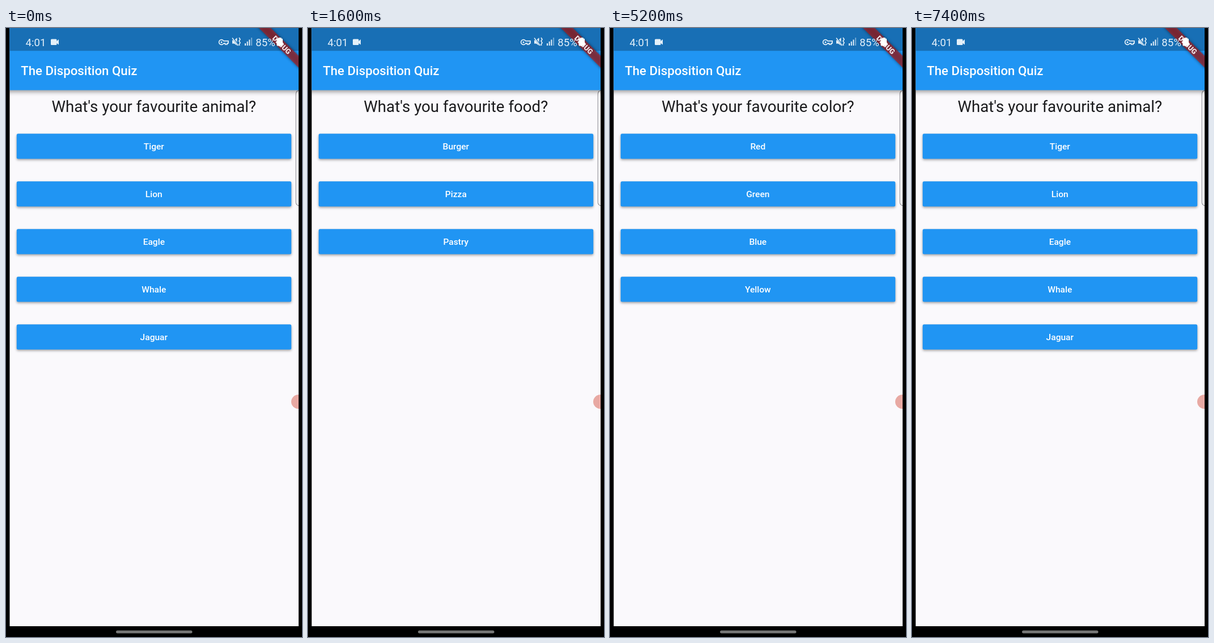
Write an HTML page with a canvas that moves like this. It is 522x1073 px and loops after 8000 ms.

```html
<!DOCTYPE html>
<html lang="en">
<head>
<meta charset="utf-8">
<title>Quiz app</title>
<style>
  html, body { margin: 0; width: 522px; height: 1073px; overflow: hidden; background: #000; }
  canvas { display: block; }
</style>
</head>
<body>
<canvas id="stage" width="522" height="1073"></canvas>
<script>
const ctx = document.getElementById('stage').getContext('2d');
const LOOP = 8000, STEP = 100;
const LEFT = 6.5, RIGHT = 516, BOTTOM = 1054, MID = 260.8;
const BLUE = '#2095f3', PAPER = '#faf9fc';

const color = { title: "What's your favourite color?", answers: ['Red', 'Green', 'Blue', 'Yellow'] };
const animal = { title: "What's your favourite animal?", answers: ['Tiger', 'Lion', 'Eagle', 'Whale', 'Jaguar'] };
const food = { title: "What's you favourite food?", answers: ['Burger', 'Pizza', 'Pastry'] };
const result = null;

const scenes = [[0, animal], [1300, food], [2200, result], [5200, color], [6800, animal]];
const taps = [
  { start: 1195, row: 2, x: 372, y: 384 },
  { start: 6750, row: 0, x: 414.5, y: 213 }
];

function text(str, x, y, size, weight = 400, fill = '#fff', align = 'center') {
  ctx.font = `${weight} ${size}px Roboto, sans-serif`;
  ctx.textAlign = align;
  ctx.fillStyle = fill;
  ctx.fillText(str, x, y);
}

function box(x, y, w, h, fill, radius = 0) {
  ctx.fillStyle = fill;
  ctx.beginPath();
  ctx.roundRect(x, y, w, h, radius);
  ctx.fill();
}

function shape(points, fill) {
  ctx.fillStyle = fill;
  ctx.beginPath();
  points.forEach(([x, y]) => ctx.lineTo(x, y));
  ctx.fill();
}

function line(points, stroke, width) {
  ctx.strokeStyle = stroke;
  ctx.lineWidth = width;
  ctx.beginPath();
  points.forEach(([x, y]) => ctx.lineTo(x, y));
  ctx.stroke();
}

function disc(x, y, r, fill) {
  ctx.fillStyle = fill;
  ctx.beginPath();
  ctx.arc(x, y, r, 0, Math.PI * 2);
  ctx.fill();
}

function raised(x, y, w, h, fill, radius, blur, drop) {
  ctx.save();
  ctx.shadowColor = 'rgba(0,0,0,.36)';
  ctx.shadowBlur = blur;
  ctx.shadowOffsetY = drop;
  box(x, y, w, h, fill, radius);
  ctx.restore();
}

const rowTop = row => 186.2 + row * 84;

function drawQuestion({ title, answers }) {
  text(title, MID, 148, 27.7, 400, '#1b1b1d');
  answers.forEach((label, row) => {
    raised(18.8, rowTop(row), 484.4, 44.4, BLUE, 2.5, 4, 2);
    text(label, MID, rowTop(row) + 28, 15.55, 500);
  });
}

function drawResult() {
  text('You should aspire to be a better human being', MID, 130.5, 22.2, 700, '#f84f51');
  raised(43.4, 172.5, 435.2, 123.2, '#448aff', 2.5, 4, 2);
  text('Restart The App', MID, 244, 27.7, 500);
}

// A touch ripple spreads from the finger and fades inside its button.
function drawRipple({ start, row, x, y }, time) {
  const age = time - start;
  const fade = Math.min(1, 2 - age / 100);
  if (age < 0 || fade <= 0) return;
  ctx.save();
  ctx.beginPath();
  ctx.roundRect(18.8, rowTop(row), 484.4, 44.4, 2.5);
  ctx.clip();
  disc(x, y, age * 1.1, `rgba(255,255,255,${0.12 * fade})`);
  ctx.restore();
}

function drawBanner() {
  ctx.save();
  ctx.translate(RIGHT, 0);
  ctx.rotate(Math.PI / 4);
  ctx.filter = 'blur(2.5px)';
  box(-60, 34.6, 120, 14.8, 'rgba(0,0,0,.5)');
  ctx.filter = 'none';
  box(-60, 34.6, 120, 14.8, 'rgba(183,28,28,.63)');
  text('DEBUG', 0, 46.5, 12.6, 900, '#f3e7ea');
  ctx.restore();
}

function drawStatus() {
  const ink = '#e4f0f9', dim = 'rgba(228,240,249,.45)';
  text('4:01', 34.5, 31.5, 18.6, 400, ink, 'left');
  box(79, 19.5, 10.5, 10.5, ink, 1.5);
  shape([[88.5, 24], [93, 20], [93, 29.5], [88.5, 26]], ink);

  ctx.strokeStyle = ink;
  ctx.lineWidth = 1.7;
  ctx.beginPath();
  ctx.arc(380, 25, 4.4, 0.5, Math.PI * 2 - 0.5);
  ctx.lineTo(392, 22.9);
  ctx.lineTo(392, 26.8);
  ctx.lineTo(390, 26.8);
  ctx.lineTo(390, 29);
  ctx.lineTo(386.5, 29);
  ctx.lineTo(386.5, 27);
  ctx.closePath();
  ctx.stroke();
  disc(380, 25, 1.5, ink);

  shape([[399, 21.5], [402.5, 21.5], [407.5, 17], [407.5, 31], [402.5, 27.5], [399, 27.5]], ink);
  line([[399, 16.5], [410, 31]], '#186fb5', 3);
  line([[399, 17.5], [409.5, 31]], ink, 1.5);
  line([[411, 17], [413, 20], [411, 23], [413, 26], [411, 29], [412, 31]], ink, 1.6);

  for (let i = 0; i < 4; i++) {
    const h = 4 + i * 3.3;
    box(421 + i * 3.7, 31 - h, 2, h, i < 3 ? ink : dim);
  }
  text('85%', 440.3, 31.5, 18.6, 400, ink, 'left');
  box(477.5, 18.5, 10.5, 13, '#fff', 1.5);
  box(480, 17, 5.5, 2, '#fff');
}

function drawEdgeHandle() {
  ctx.beginPath();
  ctx.roundRect(511.2, 110, 16, 203, 6);
  ctx.fillStyle = '#fdfdfe';
  ctx.fill();
  ctx.strokeStyle = '#929297';
  ctx.lineWidth = 1.1;
  ctx.stroke();
}

function draw(time) {
  ctx.fillStyle = '#000';
  ctx.fillRect(0, 0, 522, 1073);
  box(194, 1061.5, 134.5, 5, '#777', 2.5);

  ctx.save();
  ctx.beginPath();
  ctx.rect(LEFT, 0, RIGHT - LEFT, BOTTOM);
  ctx.clip();
  box(0, 0, 522, BOTTOM, PAPER);

  const scene = scenes.filter(([start]) => start <= time).pop()[1];
  if (scene) drawQuestion(scene);
  else drawResult();
  taps.forEach(tap => drawRipple(tap, time));

  drawEdgeHandle();
  raised(-10, 0, 542, 109.5, BLUE, 0, 7, 3);
  box(0, 0, 522, 40.3, '#186fb5');
  text('The Disposition Quiz', 26.3, 83.3, 22.2, 500, '#fff', 'left');
  drawBanner();
  drawStatus();
  disc(515.5, 658.5, 12.5, '#e8a9a3');
  ctx.restore();
}

const origin = performance.now();
function tick() {
  const time = (performance.now() - origin) % LOOP;
  draw(Math.floor(time / STEP) * STEP);
  requestAnimationFrame(tick);
}
tick();
</script>
</body>
</html>
```
